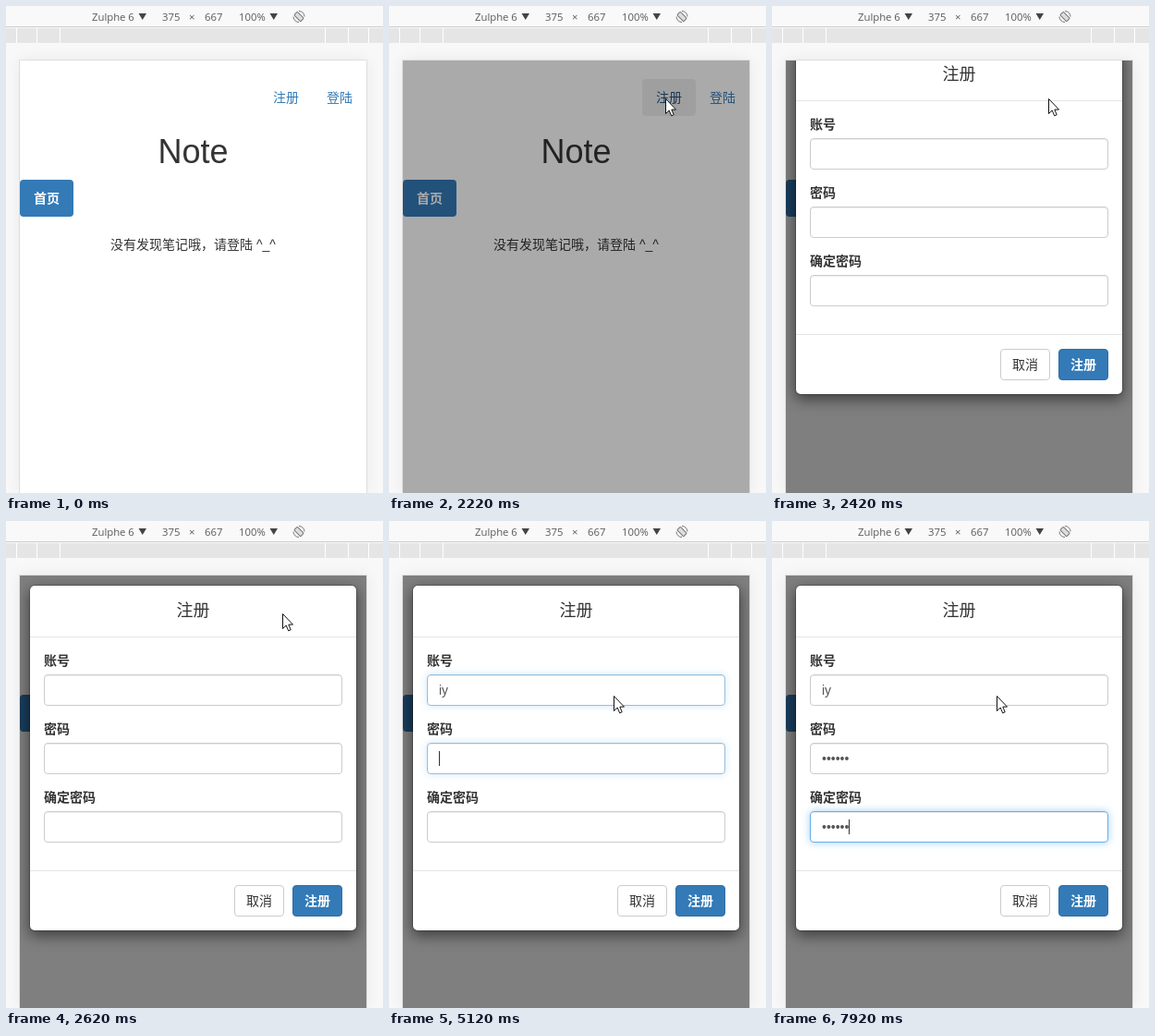
An HTML page that plays this animation: 408x527 px, repeating every 8 s.

```html
<!DOCTYPE html>
<html lang="zh-CN">
<head>
<meta charset="utf-8">
<title>Note</title>
<style>
* { box-sizing: border-box; }
html, body { margin: 0; width: 100%; height: 100%; overflow: hidden; background: #f8f8f8; }
body { position: relative; font: 14px/20px 'Liberation Sans', 'Noto Sans CJK SC', 'Noto Sans CJK', sans-serif; color: #333; }
svg { position: absolute; left: 0; top: 0; overflow: visible; }
.bar text { font: 11.3px 'Open Sans', sans-serif; fill: #5a5a5a; }

.page { position: absolute; left: 15px; top: 59px; width: 375px; height: 468px; background: #fff;
  box-shadow: 0 0 0 1px rgba(0,0,0,.08), 0 0 16px rgba(0,0,0,.07); }
.clip { position: absolute; inset: 0; overflow: hidden; }
.link { position: absolute; top: 20px; padding: 10px 15px; border-radius: 4px; color: #337ab7; }
.link.focus { background: #eee; color: #23527c; }
.home { left: 0; top: 129px; background: #337ab7; color: #fff; font-weight: bold; }
h1, p { position: absolute; width: 100%; margin: 0; text-align: center; }
h1 { top: 79px; font-size: 36px; line-height: 40px; font-weight: normal; }
p { top: 189px; }
.backdrop { position: absolute; inset: 0; background: #000; }

.modal { position: absolute; left: 10px; top: 10px; width: 355px; background: #fff; background-clip: padding-box;
  border: 1px solid rgba(0,0,0,.2); border-radius: 6px; box-shadow: 0 5px 15px rgba(0,0,0,.5); }
.title { padding: 15px; border-bottom: 1px solid #e5e5e5; font-size: 18px; line-height: 25px; text-align: center; }
.body { padding: 15px; }
.label { margin-bottom: 5px; font-weight: bold; }
.input { --glow: 0%; height: 34px; margin-bottom: 15px; padding: 6px 12px; border-radius: 4px; color: #555;
  border: 1px solid color-mix(in srgb, #66afe9 var(--glow), #ccc);
  box-shadow: inset 0 1px 1px rgba(0,0,0,.075),
    0 0 8px color-mix(in srgb, rgba(102,175,233,.6) var(--glow), transparent); }
.input i { display: inline-block; width: 1px; height: 16px; margin-right: -1px; vertical-align: -3px; background: #333; }
.footer { display: flex; justify-content: flex-end; gap: 9px; padding: 15px; border-top: 1px solid #e5e5e5; }
.button { padding: 6px 12px; border: 1px solid #ccc; border-radius: 4px; }
.primary { background: #337ab7; border-color: #2e6da4; color: #fff; font-weight: bold; }
</style>
</head>
<body>
<svg class="bar" width="408" height="41">
  <path fill="#f9f9f9" d="M0 0h408v41H0z"/>
  <path fill="#ccc" d="M0 22h408v1H0z"/>
  <path fill="#e5e5e5" d="M0 24h408v16H0z"/>
  <path stroke="#fff" d="M11.5 24v16M33.5 24v16M58.5 24v16M345.5 24v16M370.5 24v16M392.5 24v16"/>
  <text x="93" y="16">Zulphe 6</text>
  <text x="169" y="16">375</text>
  <text x="198" y="16">×</text>
  <text x="215" y="16">667</text>
  <text x="252" y="16">100%</text>
  <path fill="#444" d="M143.500 8h8.500l-4.250 7zM285.500 8h8.500l-4.250 7z"/>
  <g transform="translate(317 11.500)" fill="none" stroke="#777">
    <rect x="-2.500" y="-5" width="5" height="10" rx="1" transform="rotate(-45)" fill="#ddd"/>
    <path d="M0 -6A6 6 0 0 1 6 0M0 6A6 6 0 0 1 -6 0"/>
  </g>
</svg>

<div class="page"><div class="clip">
  <div class="link" id="signup" style="left:259px">注册</div>
  <div class="link" style="left:317px">登陆</div>
  <h1>Note</h1>
  <div class="link home">首页</div>
  <p>没有发现笔记哦，请登陆 ^_^</p>
  <div class="backdrop" id="backdrop"></div>
  <div class="modal" id="modal">
    <div class="title">注册</div>
    <div class="body">
      <div class="label">账号</div><div class="input"><span></span><i></i></div>
      <div class="label">密码</div><div class="input"><span></span><i></i></div>
      <div class="label">确定密码</div><div class="input"><span></span><i></i></div>
    </div>
    <div class="footer"><div class="button">取消</div><div class="button primary">注册</div></div>
  </div>
</div></div>

<svg id="pointer" width="12" height="20">
  <circle id="ring" cx="-4.500" cy="-4.500" r="11" fill="none" stroke="#ff0" stroke-width="3"/>
  <path d="M.5 .5V16.500L4.200 13 6.700 18.800 9.200 17.700 6.800 12.100H11.500Z" fill="#fff" stroke="#111"/>
</svg>

<script>
const LOOP = 8000, STEP = 100, PHASE = 20;
const $ = id => document.getElementById(id);
const inputs = [...document.querySelectorAll('.input')];

const fields = [
  { focus: 3520, glow: 3620, text: 'iy', keys: [4520, 4620] },
  { focus: 5020, glow: 5070, text: '••••••', keys: [5820, 5920, 6020, 6320, 6420, 6620] },
  { focus: 6920, glow: 6970, text: '••••••', keys: [7120, 7320, 7420, 7620, 7820, 7920] }
];
const moves = [
  { start: 520, length: 700, from: [412, 77], to: [297, 105] },
  { start: 1320, length: 300, from: [297, 105], to: [299, 100] },
  { start: 2820, length: 400, from: [299, 100], to: [243, 189] }
];

const ramp = (t, start, length) => Math.min(1, Math.max(0, (t - start) / length));
const within = (t, start, end) => t >= start && t < end;

function drawField(field, i, t) {
  const blur = fields[i + 1] || { focus: LOOP, glow: LOOP };
  const typed = field.keys.filter(k => k <= t);
  const lastInput = typed.at(-1) ?? field.focus;
  const caret = within(t, field.focus, blur.focus) && (t - lastInput) % 1000 < 500;
  const glow = ramp(t, field.glow, 100) - ramp(t, blur.glow, 100);
  const [text, bar] = inputs[i].children;
  text.textContent = field.text.slice(0, typed.length);
  bar.style.visibility = caret ? 'visible' : 'hidden';
  inputs[i].style.setProperty('--glow', glow * 100 + '%');
}

function drawPointer(t) {
  const move = moves.findLast(m => t > m.start);
  $('pointer').style.display = move ? '' : 'none';
  if (!move) return;
  const p = Math.sin(ramp(t, move.start, move.length) * Math.PI / 2);
  const [x, y] = move.from.map((a, i) => Math.round(a + (move.to[i] - a) * p));
  $('pointer').style.transform = `translate(${x}px, ${y}px)`;
  $('ring').style.display = within(t, 2020, 2220) || within(t, 3420, 3620) ? '' : 'none';
}

function draw(now) {
  const t = Math.floor((now % LOOP - PHASE) / STEP) * STEP + PHASE;
  $('signup').classList.toggle('focus', t >= 2220);
  $('backdrop').style.opacity = ramp(t, 2120, 150) / 2;
  const slide = (1 - ramp(t, 2255, 300)) ** 1.75;
  $('modal').style.opacity = ramp(t, 2255, 150);
  $('modal').style.transform = `translateY(${Math.round(-94 * slide)}px)`;
  fields.forEach((field, i) => drawField(field, i, t));
  drawPointer(t);
}

const began = performance.now();
function tick() {
  draw(performance.now() - began);
  requestAnimationFrame(tick);
}
tick();
</script>
</body>
</html>
```
